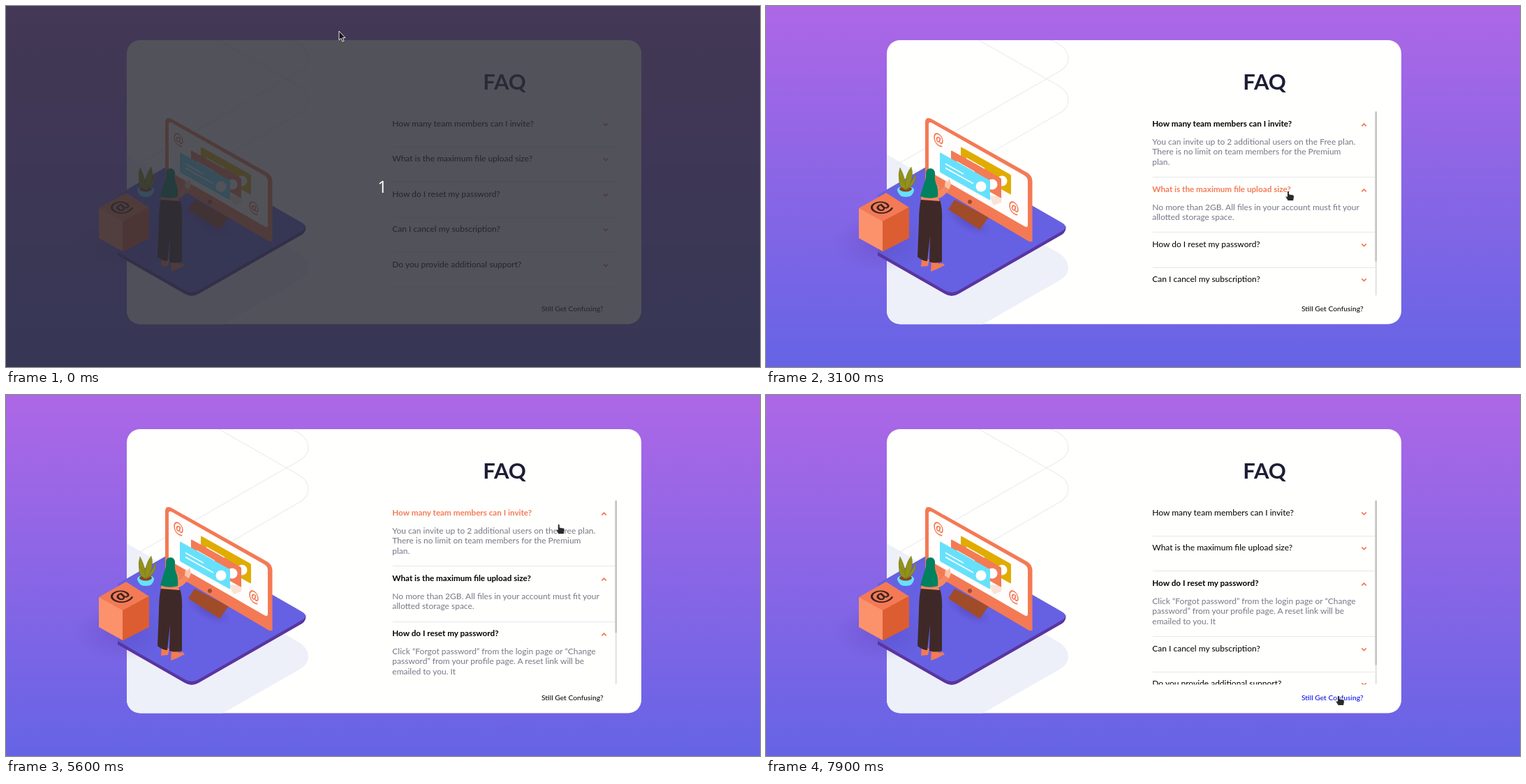
An HTML page for the animation above (8000 ms loop, 1080 by 518 pixels).

```html
<!DOCTYPE html>
<html lang="en">
<head>
<meta charset="utf-8">
<title>FAQ accordion</title>
<style>
  html, body { margin: 0; width: 100%; height: 100%; overflow: hidden; }
  #stage { display: block; width: 100vw; height: 100vh; }
  text { font-family: Lato, "Open Sans", sans-serif; font-size: 12px; }
  .at { font-weight: bold; text-anchor: middle; }
  .bold { font-weight: bold; font-size: 11.7px; }
  .answer { fill: #787887; }
  .chevron { fill: none; stroke: #f47b56; stroke-width: 1.8; }
</style>
</head>
<body>
<svg id="stage" viewBox="0 0 1080 518" preserveAspectRatio="none">
  <defs>
    <linearGradient id="sky" x2="0" y2="1">
      <stop stop-color="#ad67e6"/><stop offset="1" stop-color="#6564e5"/>
    </linearGradient>
    <radialGradient id="shade">
      <stop stop-color="#4a2f9c" stop-opacity=".4"/><stop offset="1" stop-color="#4a2f9c" stop-opacity="0"/>
    </radialGradient>
    <clipPath id="card"><rect x="173" y="49" width="737" height="407.5" rx="19"/></clipPath>
  </defs>
  <rect width="1080" height="518" fill="url(#sky)"/>

  <g clip-path="url(#card)">
    <rect x="173" y="49" width="737" height="408" fill="#fffffe"/>
    <path d="M173 213L420 355Q433 363 433 376Q433 387 420 394L310 457H173Z" fill="#edf0f9"/>
    <g fill="none" stroke="#ededf0" stroke-width="1.2">
      <path d="M408 49Q433 59 433 75Q433 87 420 94L173 236"/>
      <path d="M305 49L420 115Q433 123 433 135Q433 147 420 154L230 264"/>
    </g>
  </g>

  <!-- platform -->
  <path d="M160 352V358L256 413Q266 419 276 413L424 328Q430 324 429.500 316L266 400Z" fill="#5a359f"/>
  <path d="M160 271L248 220Q257 215 266 220L424 311Q434 317 424 323L276 408Q266 414 256 408L160 353Z" fill="#6661e2"/>
  <ellipse cx="165" cy="340" rx="68" ry="42" fill="url(#shade)" opacity=".6"/>
  <ellipse cx="290" cy="308" rx="36" ry="15" transform="rotate(30 290 308)" fill="url(#shade)"/>

  <!-- monitor -->
  <path d="M270 278L261 292L306 321L319 303Z" fill="#a04c29"/>
  <path d="M228 166Q229 158 237 162L374 239Q381 243 381.500 251V338L377 338L228 250Z" fill="#f37a55"/>
  <path d="M233 170Q233 165 238 168L370 243Q375 246 375 252V314Q375 319 370 316L233 237Z" fill="#fffefd"/>
  <circle cx="292" cy="281" r="3" fill="#a04c29"/>
  <text class="at" transform="matrix(.8 .46 0 1 247 198)" style="font-size:22px" fill="#f37a55">@</text>
  <text class="at" transform="matrix(.8 .46 0 1 355 296)" style="font-size:22px" fill="#f37a55">@</text>
  <path d="M319 272L338 273L337 282L326 286Z" fill="#f9e3d6"/>
  <g id="panels"></g>

  <!-- plant -->
  <path d="M188 264Q190 274 200 274Q211 274 212 264Z" fill="#67e1fb"/>
  <ellipse cx="200" cy="264" rx="12" ry="5.500" fill="#67e1fb"/>
  <ellipse cx="200" cy="262.500" rx="9" ry="4" fill="#8c4526"/>
  <g fill="#91911c" stroke="#77780f" stroke-width=".5">
    <path d="M199 263Q186 250 192 232Q200 247 201 263Z"/>
    <path d="M200 263Q211 250 215 240Q215 256 202 263Z"/>
    <path d="M199 263Q198 244 208 231Q213 247 202 263Z"/>
    <path d="M199 263Q189 259 191 246Q199 252 201 263Z"/>
  </g>

  <!-- box -->
  <path d="M133 290L172 268L205 289L167 310Z" fill="#f37a55"/>
  <path d="M133 290L167 309V352L133 333Z" fill="#fc926c"/>
  <path d="M167 309L205 288.500V333L167 352.500Z" fill="#dc5d31"/>
  <text class="at" transform="matrix(.866 -.5 .866 .5 174 294)" style="font-size:31px" y="-1" x="-1" fill="#3b2422">@</text>

  <!-- figure -->
  <path d="M223 362L222 374L232 373L234 364ZM237 366L236 381L244 378L256 372L253 369L247 370V366Z" fill="#f37a55"/>
  <path d="M222 277L249 278Q253 290 252 310L252 367Q243 370 234 367L235 330L231 366Q224 366 217 360L219 310Q219 290 222 277Z" fill="#3f2928"/>
  <path d="M243 254Q248 254 249 264L259 256L264 261Q254 275 247 276L249 280L222 278L223 268Z" fill="#f58860"/>
  <path d="M256 259L257 250L260 252L263 248L265 256L262 263Z" fill="#fcc4aa"/>
  <path d="M229 240Q229 233 236 233Q243 234 242 243Q241 250 245 258Q247 266 246 274Q233 278 221 273Q224 262 227 253Q230 247 229 240Z" fill="#00815f"/>

  <text x="714" y="120" text-anchor="middle" style="font-size:31px;font-weight:bold" fill="#1d1e35">FAQ</text>
  <svg id="list" x="550" y="151" width="326" height="264.500"></svg>
  <text id="link" x="767" y="438" style="font-size:10.300px">Still Get Confusing?</text>

  <g id="veil">
    <rect width="1080" height="518" fill="#2c2e36" opacity=".82"/>
    <text x="539" y="268" text-anchor="middle" style="font:24px 'Open Sans',sans-serif" fill="#fff">1</text>
  </g>
  <g id="cursor" stroke="#fff" stroke-width=".9">
    <path d="M0 0V13L3 10.300L5 15L7 14L5.200 9.600H9Z" fill="#15151a"/>
    <path d="M-1.500 1.500Q0 -1 1.500 1.500V5L7 6Q8.500 6.500 8.500 9L7.500 14.500H-.5L-4 9Q-4 7 -2 8.300L-1.500 8.500Z" fill="#2b2b2b"/>
  </g>
</svg>
<script>
const LOOP = 8000, ROW = 50.45, LEAD = 14.4, VIEW = 264, OPEN_MS = 400;
const ORANGE = '#f47b56';
const $ = id => document.getElementById(id);

function add(parent, tag, attrs, text = '') {
  const node = document.createElementNS('http://www.w3.org/2000/svg', tag);
  set(node, attrs);
  node.textContent = text;
  return parent.appendChild(node);
}
function set(node, attrs) {
  for (const key in attrs) node.setAttribute(key, attrs[key]);
}

// Cards floating on the monitor
for (const [x, y, fill] of [[279, 202, '#e0ac00'], [265, 207, ORANGE], [249, 210, '#67e1fb']]) {
  const g = add($('panels'), 'g', { transform: `matrix(1 .56 0 1 ${x} ${y})` });
  add(g, 'rect', { width: 72, height: 28.5, rx: 1.5, fill });
  add(g, 'path', { d: 'M8 12H34M8 18H48', stroke: '#fff', 'stroke-width': 1.8 });
  add($('panels'), 'circle', { cx: x + 59, cy: y + 49, r: 7.5, fill: '#fffefd' });
}

// open / close: click times
const items = [
  { q: 'How many team members can I invite?', open: 1260, close: 6200, a: [
    'You can invite up to 2 additional users on the Free plan.',
    'There is no limit on team members for the Premium', 'plan.'] },
  { q: 'What is the maximum file upload size?', open: 2760, close: 6960, a: [
    'No more than 2GB. All files in your account must fit your', 'allotted storage space.'] },
  { q: 'How do I reset my password?', open: 4160, a: [
    'Click “Forgot password” from the login page or “Change',
    'password” from your profile page. A reset link will be', 'emailed to you. It'] },
  { q: 'Can I cancel my subscription?', a: [] },
  { q: 'Do you provide additional support?', a: [] }
];
for (const item of items) {
  const g = item.g = add($('list'), 'g', {});
  item.title = add(g, 'text', { x: 3.3, y: 22 }, item.q);
  item.box = add(g, 'svg', { y: 37, width: 326, height: 0 });
  item.a.forEach((line, i) =>
    add(item.box, 'text', { class: 'answer', x: 3.3, y: Math.round(11 + i * LEAD) }, line));
  item.chevron = add(g, 'path', { class: 'chevron', d: 'M-3.2 -1.600L0 1.600L3.200 -1.600' });
  item.line = add(g, 'rect', { x: 4, height: 1, fill: '#e7e7e9' });
}
const track = add($('list'), 'rect', { x: 322.5, width: 2.5, y: .5, height: VIEW, fill: '#e6e6e8' });
const thumb = add($('list'), 'rect', { x: 322.5, width: 2.5, fill: '#c3c3c5' });

// [time, x, y] of the pointer tip, and [time, offset] of the list
const path = [
  [50, 477, 36], [780, 768, 178], [1650, 768, 178], [2080, 748, 265], [3400, 748, 265],
  [3690, 732, 292], [3790, 732, 292], [3980, 735, 286], [4550, 735, 286], [4880, 783, 193],
  [5400, 783, 193], [5880, 806, 172], [6050, 806, 172], [6390, 816, 248], [6500, 816, 248],
  [6780, 819, 232], [7380, 819, 232], [7790, 816, 427], [7890, 820, 431]];
const wheel = [[3420, 0], [3650, 60.5], [5050, 60.5], [5350, 0]];

const clamp = v => Math.max(0, Math.min(1, v));
const easeOut = p => 1 - (1 - clamp(p)) ** 2.3;

function at(keys, t) {
  const i = keys.findIndex(k => k[0] > t);
  if (i <= 0) return (i ? keys[keys.length - 1] : keys[0]).slice(1);
  const a = keys[i - 1], b = keys[i], p = (t - a[0]) / (b[0] - a[0]);
  const s = p * p * (3 - 2 * p);
  return a.slice(1).map((v, k) => v + (b[k + 1] - v) * s);
}

function openness(item, t) {
  if (!(t >= item.open)) return 0;
  return t >= item.close ? 1 - easeOut((t - item.close) / OPEN_MS) : easeOut((t - item.open) / OPEN_MS);
}

function render(t) {
  const [x, y] = at(path, t);
  const heights = items.map(item => openness(item, t) * item.a.length * LEAD);
  const total = ROW * items.length + heights.reduce((a, b) => a + b);
  const bar = total > VIEW;
  const scroll = Math.min(at(wheel, t)[0], Math.max(0, total - VIEW));
  const inList = x > 554 && x < 872 && y > 151 && y < 415;
  let top = -scroll, pointing = false;

  items.forEach((item, i) => {
    const h = heights[i], next = top + ROW + h;
    const over = inList && y >= top + 151.5 && y < next + 151.5;
    const active = t >= item.open && !(t >= item.close);
    pointing = pointing || over;
    set(item.g, { transform: `translate(0 ${Math.round(top)})` });
    set(item.title, { class: active ? 'bold' : '', fill: over ? ORANGE : '#000' });
    set(item.box, { height: h, visibility: h > 0 ? 'visible' : 'hidden' });
    set(item.chevron, { transform: `translate(${bar ? 306.5 : 309} ${active ? 19.7 : 19}) scale(1 ${active ? -1 : 1})` });
    set(item.line, { y: 51 + Math.round(h), width: bar ? 318.5 : 321 });
    top = next;
  });

  const visibility = bar ? 'visible' : 'hidden', ratio = VIEW / total;
  set(track, { visibility });
  set(thumb, { visibility, y: .5 + scroll * ratio, height: VIEW * Math.min(1, ratio) });

  const onLink = x > 767 && x < 855 && y > 429 && y < 442;
  set($('link'), { fill: onLink ? '#0000ee' : '#000' });
  set($('veil'), { visibility: t < 100 ? 'visible' : 'hidden' });
  const [arrow, hand] = $('cursor').children;
  set($('cursor'), { transform: `translate(${x} ${y})` });
  set(arrow, { visibility: pointing || onLink ? 'hidden' : 'visible' });
  set(hand, { visibility: pointing || onLink ? 'visible' : 'hidden' });
}

const start = performance.now();
function frame() {
  render((performance.now() - start) % LOOP);
  requestAnimationFrame(frame);
}
frame();
</script>
</body>
</html>
```
